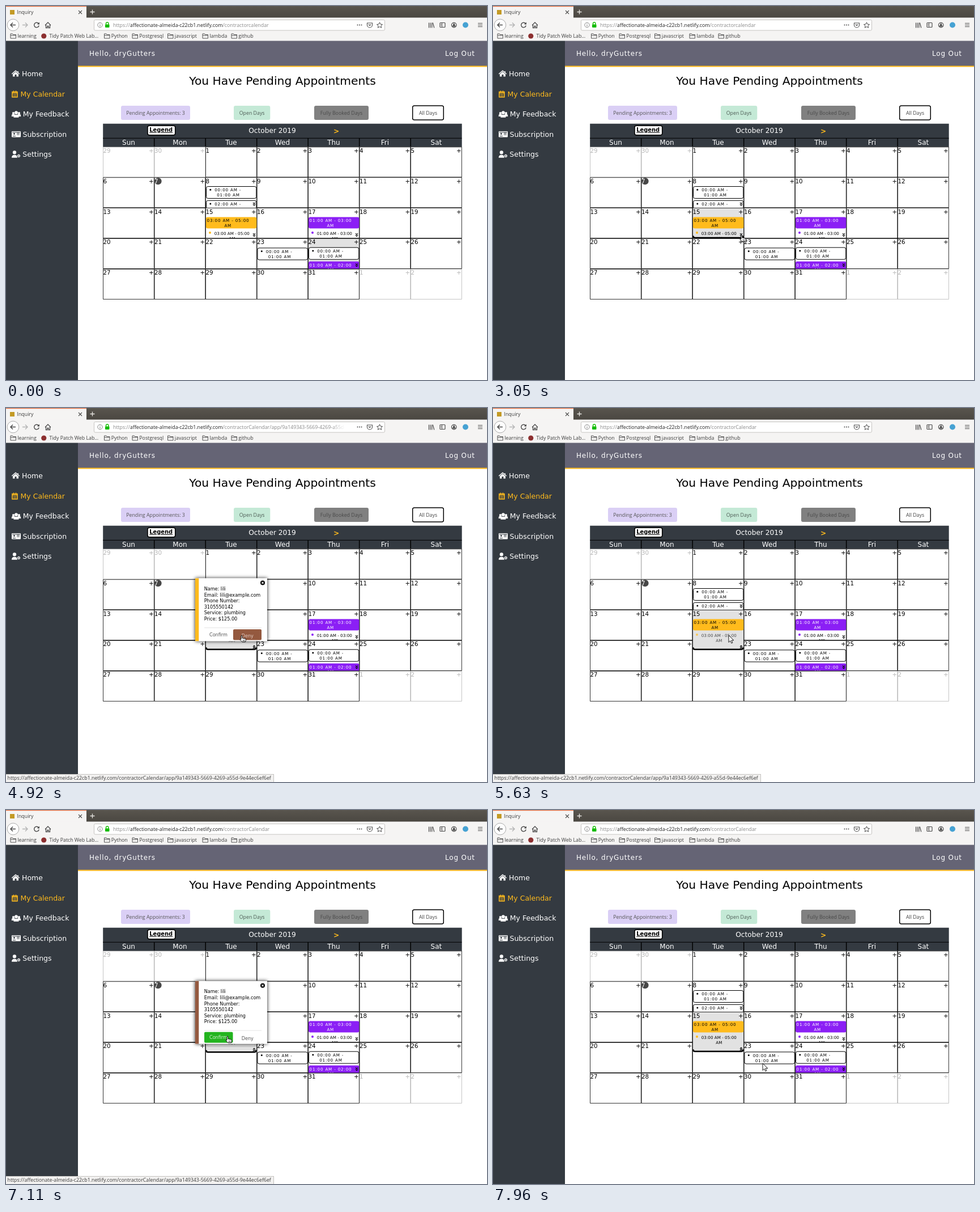
These frames come from a looping animation (849x660 px, 8000 ms). An HTML page:

```html
<!DOCTYPE html>
<html lang="en">
<head>
<meta charset="utf-8">
<title>Calendar</title>
<style>
html, body { margin: 0; width: 849px; height: 660px; overflow: hidden; background: #fff; }
svg { display: block; }
text { font-family: "DejaVu Sans", sans-serif; white-space: pre; }
.ui { font-family: "Open Sans", sans-serif; font-size: 8.8px; fill: #3c3c3c; }
.nav { font-size: 12.5px; fill: #fff; }
.bar { font-size: 12px; letter-spacing: .84px; fill: #fff; }
.num { font-size: 10.3px; }
.slot { font-size: 7.2px; letter-spacing: .8px; }
.link { font-size: 7.2px; }
.card text { font-size: 8.1px; }
</style>
</head>
<body>
<svg id="stage" width="849" height="660" viewBox="0 0 849 660"></svg>
<script>
const DARK = '#343a41', YELLOW = '#ffbb1c', PURPLE = '#8b1ff5', BROWN = '#94593f', GREY = '#e2e2e2';
const COL = 90.5, ROW = 53.85, LEFT = 171.2, TOP = 248.5;

const rect = (x, y, w, h, fill, more = '') => `<rect x="${x}" y="${y}" width="${w}" height="${h}" fill="${fill}" ${more}/>`;
const dot = (x, y, r, fill, more = '') => `<circle cx="${x}" cy="${y}" r="${r}" fill="${fill}" ${more}/>`;
const line = (d, color, w = 1, more = '') => `<path d="${d}" fill="none" stroke="${color}" stroke-width="${w}" ${more}/>`;
const shape = (d, fill, more = '') => `<path d="${d}" fill="${fill}" ${more}/>`;
const text = (x, y, s, cls, more = '') => `<text x="${x}" y="${y}" class="${cls}" ${more}>${s}</text>`;
const group = (id, body, more = '') => `<g id="${id}" ${more}>${body}</g>`;
const MID = 'text-anchor="middle"', END = 'text-anchor="end"';

const HOST = 'affectionate-almeida-c22cb1.netlify.com';
const LONG = '/contractorCalendar/app/9a149343-5669-4269-a55d-9e44ec6ef6ef';

function browser() {
  const ink = '#4c4c4c';
  const folder = x => line(`M${x} 49h3.5l1 1.5h5v6.5h-9.5z M${x} 52h9.5`, '#555', 1);
  const marks = [[8, 'learning'], [173.5, 'Python'], [223, 'Postgresql'], [285.5, 'javascript'], [347, 'lambda'], [398, 'github']];
  return rect(0, 0, 849, 21, 'url(#top)') + rect(0, 0, 142, 21, '#f5f4f3') + rect(0, 0, 142, 1.2, '#e4693a')
    + rect(0, 20.5, 849, 41, '#f5f4f3')
    + rect(7, 7, 8, 8, '#c39a25') + text(19.5, 13.5, 'Inquiry', 'ui')
    + line('M128 8l6 6m0-6l-6 6', ink, 1.1) + line('M148.500 10.500h8m-4-4v8', '#e8e6e2', 1.3)
    + dot(12.5, 33.5, 10.3, '#fdfdfd', 'stroke="#aaa"') + line('M17 33.500H8m4-4l-4 4 4 4', ink, 1.5)
    + line('M29 33.500h9m-4-4l4 4-4 4', '#b4b4b4', 1.4)
    + line('M57.500 31a4.300 4.300 0 1 0 .7 3.500', ink, 1.4) + shape('M59 28.500v4h-4z', ink)
    + line('M69 34l5-5 5 5m-8.500-1v5.500h2.500v-3h2v3h2.500v-5.500', ink, 1.3)
    + rect(155.5, 24.5, 513, 18.5, '#fff', 'rx="2" stroke="#c6c4c1"')
    + dot(166, 33.5, 4.2, 'none', 'stroke="#888"') + line('M166 33v3m0-5v1', '#888', 1.1)
    + rect(175, 32.5, 7.5, 5.5, '#12bc00', 'rx="1"') + line('M176.500 33v-2a2.200 2.200 0 0 1 4.400 0v2', '#12bc00', 1.4)
    + [620.5, 624, 627.5].map(x => dot(x, 33.5, 1, ink)).join('')
    + line('M637.500 30h9v3.500a4.500 4.500 0 0 1-9 0z M640 32.500l2 2 2-2', ink, 1.1)
    + line('M659.500 28.800l1.500 3.300 3.500.4-2.600 2.400.7 3.500-3.100-1.800-3.100 1.800.7-3.500-2.600-2.400 3.500-.4z', ink)
    + line('M746.500 29.500v9m2.700-9v9m2.600-9v9m1.500-9l2.500 9', ink, 1.2)
    + rect(766, 29.5, 9, 8, 'none', 'rx="1" stroke="#4c4c4c" stroke-width="1.200"') + line('M769.500 30v7m-2-5h1m-1 2h1', ink)
    + dot(790.7, 33.6, 4.3, 'none', 'stroke="#4c4c4c" stroke-width="1.200"') + dot(790.7, 32.4, 1.7, ink) + shape('M787.700 36.500a3 3 0 0 1 6 0z', ink)
    + dot(811, 33.5, 5, '#46a2d3') + line('M833 30.500h8m-8 3h8m-8 3h8', ink, 1.2)
    + marks.map(([x, s]) => folder(x) + text(x + 12.3, 56, s, 'ui')).join('')
    + dot(66.8, 53, 4.6, '#8c2f2f') + text(76.5, 56, 'Tidy Patch Web Lab…', 'ui')
    + `<g clip-path="url(#field)"><text id="url" x="189" y="37" class="ui" style="fill:#8b8b8b">https://<tspan fill="#222">${HOST}</tspan><tspan id="path"></tspan></text></g>`
    + rect(575, 26, 23, 16, 'url(#fade)');
}

function sidebar() {
  const w = '#fff', y = YELLOW;
  const person = (x, y, s) => dot(x, y - 2.500 * s, 2.5 * s, w) + shape(`M${x - 4 * s} ${y + 5 * s}q0-5 ${4 * s}-5t${4 * s} 5z`, w);
  return rect(0, 61.5, 127, 599, DARK)
    + shape('M17 116l5 4.500v4h-3.500v-3.500h-3v3.500H12v-4z', w) + line('M10.300 120l6.700-5.800 6.700 5.800m-2.500-5v2', w, 1.4)
    + text(28, 124.3, 'Home', 'nav')
    + line('M11 151.500h9v9.300h-9zM11 153.500h9M13.500 149.500v3m4-3v3', y, 1.6) + line('M13 156.500h5m-5 2.300h5', y, 1.3, 'stroke-dasharray="1.300 .6"')
    + text(25.5, 160, 'My Calendar', 'nav', `style="fill:${y}"`)
    + person(13, 191, .8) + person(23, 191, .8) + person(18, 191, 1.15) + text(29.8, 195.4, 'My Feedback', 'nav')
    + rect(10, 221, 16, 10.5, w, 'rx="1"') + dot(14.5, 225.5, 1.5, DARK) + line('M12 229.500h5m2-5h5m-5 2.500h5M11 222.800h14', DARK)
    + text(29.5, 230.8, 'Subscription', 'nav')
    + person(15, 261.5, 1.25) + dot(22.5, 264.5, 3, w, 'stroke="#343a41"') + dot(22.5, 264.5, 1.1, DARK)
    + text(29.3, 266.4, 'Settings', 'nav');
}

function header() {
  const button = (x, w, fill, s, color, more = '') => rect(x, 176, w, 25, fill, 'rx="3" ' + more)
    + text(x + w / 2, 191.7, s, 'ui', `${MID} style="fill:${color}"`);
  return rect(127, 61.5, 722, 44.5, '#656475') + rect(127, 105.5, 722, 2, YELLOW)
    + text(147, 88, 'Hello, dryGutters', 'bar') + text(775, 88, 'Log Out', 'bar')
    + text(488, 139, 'You Have Pending Appointments', '', `${MID} font-size="20.300"`)
    + button(203, 122, '#dacff5', 'Pending Appointments: 3', '#555')
    + button(402, 64.3, '#c4e9d6', 'Open Days', '#4c5a53')
    + button(544, 96, '#808080', 'Fully Booked Days', '#484848')
    + button(717.7, 54.6, '#fff', 'All Days', '#444', 'stroke="#000" stroke-width="1.500"');
}

const chevron = (x, y, up) => line([-2.6, .4].map(d => `M${x - 2} ${y + d + (up ? 2 : 0)}l2 ${up ? -2 : 2} 2 ${up ? 2 : -2}`).join(''), '#000', 1.2);
const booked = (x, y, a, b) => rect(x + 1.3, y, 88.3, 21, '#fff', 'rx="3" stroke="#000"')
  + dot(x + 8.6, y + 5.7, 1.5, '#000') + text(x + 16, y + 8.6, a, 'slot') + text(x + 20, y + 17.6, b, 'slot');
const filled = (x, y, fill, color, s) => rect(x + .8, y, 89.3, 20, fill, 'rx="3"')
  + text(x + 2.4, y + 8.7, s, 'slot', `fill="${color}"`) + text(x + 33.2, y + 17, 'AM', 'slot', `fill="${color}"`);
const detail = (x, y, s) => text(x + 15.6, y, s, 'link') + text(x + 46.7, y + 9.2, 'AM', 'link', MID);
const dayText = (x, y, n, more = '') => text(x + .3, y + 10.3, n, 'num', more) + text(x + 89.5, y + 10.3, '+', 'num', END);

function calendar() {
  let out = rect(LEFT, 207.7, 633.5, 41, DARK) + line('M171 233.300h633.500', '#000')
    + rect(250, 211.3, 48.7, 16.5, '#fff', 'rx="3" stroke="#000" stroke-width="1.500"')
    + text(253.3, 222, 'Legend', '', 'font-size="9.900" font-weight="bold" text-decoration="underline"')
    + text(470, 224.4, 'October 2019', '', `${MID} font-size="12.200" fill="#fff"`)
    + text(583, 224.5, '&gt;', '', `${MID} font-size="12.200" font-weight="bold" fill="${YELLOW}"`);
  ['Sun', 'Mon', 'Tue', 'Wed', 'Thu', 'Fri', 'Sat'].forEach((d, i) => {
    out += text(LEFT + (i + .5) * COL, 244.7, d, '', `${MID} font-size="12" fill="#fff"`);
    if (i) out += line(`M${LEFT + i * COL} 233v15`, '#000', 1.5);
  });
  let days = '';
  for (let i = 0; i < 35; i++) {
    const n = i - 1, x = LEFT + i % 7 * COL, y = TOP + Math.floor(i / 7) * ROW;
    const other = n < 1 || n > 31, label = n < 1 ? n + 30 : n > 31 ? n - 31 : n;
    const fill = n === 24 ? `id="day24" fill="${GREY}"` : 'fill="#fff"';
    const cell = `<rect x="${x + .4}" y="${y + .4}" width="${COL - .8}" height="${ROW - .8}" ${fill} stroke="#000" stroke-width=".8"/>`
      + (n === 7 ? dot(x + 6.7, y + 6.8, 6.2, '#474747') : '')
      + dayText(x, y, label, n === 7 ? 'fill="#fff"' : '');
    days = other ? `<g opacity=".28">${cell}</g>` + days : days + cell;
  }
  const tue = LEFT + 2 * COL, wed = tue + COL, thu = wed + COL;
  return out + days
    + booked(tue, 318.5, '00:00 AM -', '01:00 AM')
    + `<g clip-path="url(#row2)">${booked(tue, 343.3, '02:00 AM -', '')}</g>` + chevron(438, 349.5)
    + filled(thu, 372.5, PURPLE, '#fff', '01:00 AM - 03:00')
    + `<g clip-path="url(#row3)">${detail(thu, 404, '01:00 AM - 03:00')}</g>` + dot(541, 400, 2, PURPLE) + chevron(619, 404)
    + booked(wed, 427, '00:00 AM -', '01:00 AM')
    + booked(thu, 426.2, '00:00 AM -', '01:00 AM')
    + `<g clip-path="url(#row4)">${filled(thu, 450.8, PURPLE, '#fff', '01:00 AM - 02:00')}</g>` + chevron(619, 457.3);
}

function day15() {
  const x = LEFT + 2 * COL;
  return shape('M353 357.300h89v66q0 4-3 4h-83q-3 0-3-4z', GREY, 'id="open"')
    + rect(353, 357.1, 89, 52, '#fff', 'id="cell"')
    + dayText(x, TOP + 2 * ROW, 15)
    + group('pending', filled(x, 372.5, YELLOW, '#000', '03:00 AM - 05:00'))
    + group('denied', booked(x, 372.8, '03:00 AM -', '05:00 AM') + line('M354.500 394.300h87', '#a99bc4', 1)
      + rect(355.8, 395.3, 84, 22, 'none', 'stroke="#999" stroke-width=".7" stroke-dasharray="1 1"'))
    + group('link', dot(360, 400, 2, YELLOW, 'id="mark"') + detail(x, 404, '03:00 AM - 05:00'))
    + group('edge', line('M353.300 -4.500q0 3.500 3 3.500h82q3 0 3-3.500', '#000', 2.5))
    + group('more', chevron(438, 404)) + group('less', chevron(438, 422, true));
}

function popup() {
  const rows = ['Name: lili', 'Email: lili@example.com', 'Phone Number:', '3105550142', 'Service: plumbing', 'Price: $125.00'];
  return rect(334, 300.5, 127, 110.8, '#fff', 'filter="url(#shadow)"') + rect(334, 300.5, 6.3, 110.8, YELLOW, 'id="stripe"')
    + rows.map((s, i) => text(349.7, 322.2 + i * 10.55, s, '')).join('')
    + line('M350 387.800h101', '#ddd', .8)
    + rect(350, 390.5, 50.5, 19, '#23b41f', 'id="yes" rx="2"') + rect(401, 390.5, 50, 19, BROWN, 'id="no" rx="2"')
    + text(359, 402.7, 'Confirm', '', 'id="yesText"') + text(415.7, 404.7, 'Deny', '', 'id="noText"')
    + dot(453, 308.5, 4, '#000') + line('M451.400 306.900l3.200 3.200m0-3.200l-3.200 3.200', '#fff', 1.2);
}

const arrow = shape('M0 0v12.500l2.900-2.700 2 4.300 2-.9-2-4.200h4z', '#fff', 'stroke="#000" stroke-width=".9"');
const hand = shape('M-1 1q1-1.600 2 0v4l5.200 1q1.300.5 1.200 2l-.8 3.700H.8L-3 7.800q0-1.500 2-.6z', '#fff', 'stroke="#000" stroke-width=".9"')
  + line('M.7 11.500h5.800M2.500 8v2m2-2v2', '#000', .9);

const clip = (id, x, y, w, h) => `<clipPath id="${id}">${rect(x, y, w, h, '#000')}</clipPath>`;
const stage = document.getElementById('stage');
stage.innerHTML = `<defs>
  <linearGradient id="top" x2="0" y2="1"><stop stop-color="#59554e"/><stop offset="1" stop-color="#4a4741"/></linearGradient>
  <linearGradient id="fade"><stop stop-color="#fff" stop-opacity="0"/><stop offset="1" stop-color="#fff"/></linearGradient>
  <filter id="shadow" x="-20%" y="-20%" width="140%" height="140%"><feDropShadow dx="0" dy="0" stdDeviation="3.400" flood-opacity=".9"/></filter>
  ${clip('field', 156, 25, 442, 18)}${clip('row2', 353, 303, 89, 53)}${clip('row3', 353, 357, 270, 52.5)}${clip('row4', 353, 411, 270, 52.5)}
</defs>` + rect(0, 0, 849, 660, '#fff') + browser() + sidebar() + header() + calendar()
  + group('day15', day15()) + group('popup', popup(), 'class="card"')
  + group('status', rect(-1, 646.5, 473.5, 14, '#f2f1f0', 'stroke="#c4c2bf"') + text(2.5, 656.3, 'https://' + HOST + LONG, 'ui'))
  + group('arrow', arrow) + group('hand', hand);

const el = {};
stage.querySelectorAll('[id]').forEach(n => el[n.id] = n);
const show = (id, on) => el[id].style.display = on ? '' : 'none';
const move = (id, x, y) => el[id].setAttribute('transform', `translate(${x} ${y})`);
const within = (t, ...spans) => spans.some(([a, b]) => t >= a && t < b);

// time, x, y of the pointer tip
const route = [
  [730, 486, 426], [1050, 357, 309], [1530, 454, 418], [1570, 454, 418], [1610, 441, 410], [1930, 441, 410], [2090, 439, 404],
  [3060, 439, 404], [3330, 404, 405], [3470, 404, 405], [3790, 400, 409], [4340, 400, 409], [4510, 389, 402],
  [4760, 389, 402], [4920, 416, 401], [6140, 416, 401], [6420, 405, 405], [6680, 405, 405], [6900, 391, 399],
  [7160, 391, 399], [7600, 540, 452], [7800, 556, 458], [7840, 556, 458], [7960, 476, 447], [8000, 476, 447]
];

function pointer(t) {
  const i = Math.max(1, route.findIndex(p => p[0] > t));
  const [a, x, y] = route[i - 1], [b, u, v] = route[i];
  const k = Math.min(1, Math.max(0, (t - a) / (b - a))), e = k * k * (3 - 2 * k);
  return [x + (u - x) * e, y + (v - y) * e];
}

function draw(t) {
  const denied = within(t, [5880, 7500]), low = denied ? 1.3 : 0;
  const over = t >= 2340, open = t >= 3110;
  const yes = within(t, [4450, 4840], [6820, 7160]), no = within(t, [4840, 5560]);
  const card = within(t, [4340, 5560], [6740, 7160]);

  el.path.textContent = within(t, [4230, 5460], [6660, 7060]) ? LONG : t < 4230 ? '/contractorcalendar' : '/contractorCalendar';
  el.day24.setAttribute('fill', over ? '#fff' : GREY);
  el.cell.setAttribute('fill', over ? GREY : '#fff');
  show('open', open);
  show('edge', over);
  move('edge', 0, open ? 427 + low : 410);
  show('more', !open);
  show('less', open);
  move('less', 0, low);
  show('pending', !denied);
  show('denied', denied);
  move('link', 0, low);
  if (open) el.link.removeAttribute('clip-path'); else el.link.setAttribute('clip-path', 'url(#row3)');
  el.link.setAttribute('opacity', within(t, [3250, 5640], [6180, 7220]) ? .68 : 1);
  el.mark.setAttribute('fill', denied ? BROWN : YELLOW);

  show('popup', card);
  move('popup', 0, low);
  el.stripe.setAttribute('fill', denied ? BROWN : YELLOW);
  show('yes', yes);
  show('no', no);
  el.yesText.setAttribute('fill', yes ? '#d5f0d3' : '#555');
  el.noText.setAttribute('fill', no ? '#e0cbc2' : '#555');
  show('status', within(t, [3300, 4270], [4450, 5640], [6180, 7880]));

  const tap = within(t, [2010, 5600], [6560, 7240]), [x, y] = pointer(t);
  show('arrow', t >= 730 && !tap);
  show('hand', tap);
  move('arrow', x, y);
  move('hand', x, y);
}

const start = performance.now();
function tick() {
  draw((performance.now() - start) % 8000);
  requestAnimationFrame(tick);
}
tick();
</script>
</body>
</html>
```
